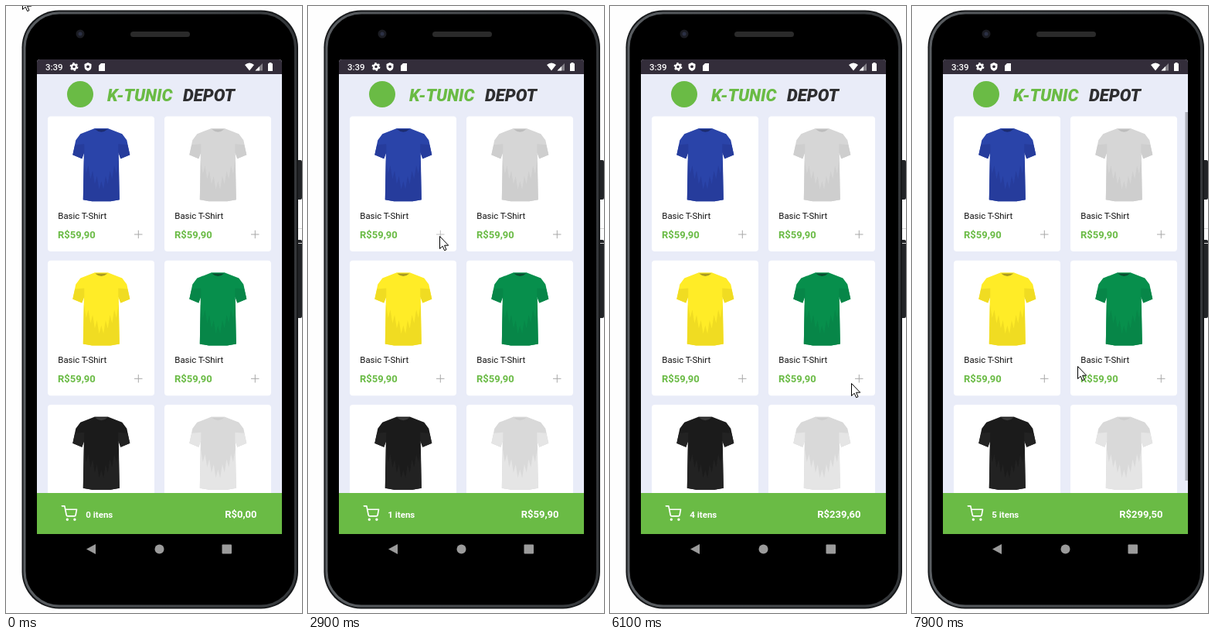
These frames come from a looping animation (383 by 784 pixels, 8 s). An HTML page:

```html
<!DOCTYPE html>
<html lang="en">
<head>
<meta charset="utf-8">
<title>Shop cart</title>
<style>
html, body { margin: 0; width: 100%; height: 100%; overflow: hidden; background: #fefefe; }
svg { display: block; }
text { font-family: Roboto, Arial, sans-serif; }
.bold { font-weight: 700; }
.price { font-size: 13px; font-weight: 700; }
</style>
</head>
<body>
<svg width="383" height="784" viewBox="0 0 383 784">
  <defs>
    <clipPath id="view"><rect x="40" y="137" width="317" height="492"/></clipPath>
    <linearGradient id="rim"><stop stop-color="#5a5e62"/><stop offset="1" stop-color="#34373a"/></linearGradient>
  </defs>

  <!-- phone -->
  <g fill="#222427">
    <rect x="376" y="199" width="7" height="51" rx="2"/>
    <rect x="376" y="302" width="7" height="101" rx="2"/>
  </g>
  <path d="M378 287.500h5M378 306.500h5" stroke="#d5d5d5"/>
  <rect x="20.500" y="5.500" width="357.500" height="773" rx="48" fill="#17191b"/>
  <rect x="24" y="9" width="350.500" height="766" rx="45" fill="#000" stroke="url(#rim)" stroke-width="3"/>
  <circle cx="96" cy="36" r="5.500" fill="#1b1c22"/>
  <circle cx="96" cy="36" r="2.500" fill="#2b3044"/>
  <rect x="161" y="33" width="77" height="7" rx="3.500" fill="#2a2a2a"/>

  <!-- screen and status bar -->
  <rect x="40" y="69" width="317" height="613" rx="4" fill="#e9ecf8"/>
  <path d="M40 88V73q0-4 4-4H353q4 0 4 4V88z" fill="#332d3a"/>
  <g fill="#fff">
    <text x="51" y="82.500" font-size="11.500" font-weight="500">3:39</text>
    <circle cx="88" cy="78.500" r="3" fill="none" stroke="#fff" stroke-width="2.500"/>
    <circle cx="88" cy="78.500" r="4.700" fill="none" stroke="#fff" stroke-width="1.500" stroke-dasharray="2.460"/>
    <path d="M106 73l4.500 2v3.500q0 4-4.500 5.500q-4.500-1.500-4.500-5.500V75z"/>
    <circle cx="106" cy="78.300" r="1.900" fill="#332d3a"/>
    <path d="M123 74h5v10h-8v-7z"/>
    <path d="M309 76q6-5 12 0l-6 7.500z"/>
    <path d="M332 74v9.500h-9.500z" opacity=".4"/>
    <path d="M328 78v5.500h-5.500z"/>
    <path d="M340.500 73h3v1.200h1.500V84h-6V74.200h1.500z"/>
  </g>

  <!-- header -->
  <circle cx="96" cy="114" r="17" fill="#6abb45"/>
  <g font-size="22" font-weight="900" font-style="italic">
    <text x="131" y="123" fill="#6abb45">K-TUNIC</text>
    <text x="229" y="123" fill="#2e2e30">DEPOT</text>
  </g>

  <g clip-path="url(#view)"><g id="list"></g></g>
  <rect id="bar" x="353.500" y="137" width="3.500" fill="#acaeb8"/>

  <!-- cart footer -->
  <rect x="40" y="629" width="317" height="53" fill="#6abb45"/>
  <g transform="translate(71.500 645) scale(.87)" fill="none" stroke="#fff" stroke-width="1.900" stroke-linecap="round" stroke-linejoin="round">
    <circle cx="9" cy="21" r="1"/><circle cx="20" cy="21" r="1"/>
    <path d="M1 1h4l2.680 13.390a2 2 0 0 0 2 1.610h9.720a2 2 0 0 0 2-1.610L23 6H6"/>
  </g>
  <text id="count" class="bold" x="103.300" y="661" font-size="11.500" fill="#fff"></text>
  <text id="total" class="price" x="324.500" y="661.300" text-anchor="end" fill="#fff"></text>

  <!-- navigation -->
  <g fill="#9b9b9b">
    <path d="M104 701.500L116 695v13z"/>
    <circle cx="198.500" cy="701.500" r="6"/>
    <rect x="279.500" y="695.500" width="12.500" height="12" rx="1"/>
  </g>

  <path id="cursor" d="M.5.500V16.500L4.200 13.200L6.600 18.700L9 17.700L6.600 12.200H11.700Z" fill="#fff" stroke="#000" stroke-linejoin="round"/>
</svg>
<script>
const LOOP = 8000, STEP = 100, PRICE = 59.9;
const $ = id => document.getElementById(id);
const money = value => 'R$' + value.toFixed(2).replace('.', ',');

// closes a right-hand outline with its mirror image
const mirror = half => half.concat(half.map(([x, y]) => [-x, y]).reverse());
const outline = points => 'M' + points.join('L') + 'Z';

const body = outline(mirror([[9, 0], [27, 7], [33, 15], [37, 34], [25, 39], [22.5, 31], [23.5, 92], [12, 94]]));
const cuffs = [1, -1].map(s => outline([[25 * s, 39], [37 * s, 34], [34 * s, 21], [22 * s, 20], [22 * s, 31]])).join('');

// jagged creases that rise towards the sides
const creases = outline(Array.from({ length: 17 }, (_, i) => {
  const x = (i - 8) * 2.8;
  return [x, 74 - Math.abs(x) * 1.2 + (i % 2 ? 8 : -6)];
}).concat([[23.5, 92], [12, 94], [-12, 94], [-23.5, 92]]));

// shirt, crease and collar colours
const shirts = [
  ['#2a44a9', '#263c9c', '#1b2b70'], ['#d6d6d6', '#cecece', '#bcbcbc'],
  ['#ffec27', '#f0dc22', '#a99a20'], ['#078f4c', '#078648', '#0b4d30'],
  ['#1b1b1b', '#222', '#3a3a3a'], ['#d9d9d9', '#e5e5e5', '#cfcfcf']
];

$('list').innerHTML = shirts.map(([main, crease, collar], i) => {
  const x = 54 + i % 2 * 151, y = 142.5 + (i >> 1) * 186.3;
  return `<g transform="translate(${x} ${y})">
    <rect width="138" height="174.500" rx="4" fill="#fff"/>
    <g transform="translate(69.300 15.700)">
      <path d="${body}" fill="${main}"/>
      <path d="${cuffs}${creases}" fill="${crease}"/>
      <path d="M-9 0H9Q6 7 0 7T-9 0" fill="${main}"/>
      <path d="M-8 1H8Q0 8-8 1" fill="${collar}"/>
    </g>
    <text x="13.300" y="132.500" font-size="11.400" fill="#111">Basic T-Shirt</text>
    <text class="price" x="13" y="157.500" fill="#6abb45">${money(PRICE)}</text>
    <path class="plus" d="M112 152.500h10.500M117.300 147.200v10.500" stroke="#a8a8a8"/>
  </g>`;
}).join('');
const pluses = document.querySelectorAll('.plus');

// pointer moves, resting in between
const home = [21, -12];
const moves = [
  { from: 300, to: 400, tip: [29, 3] },
  { from: 700, to: 1700, tip: [171, 311] },
  { from: 1800, to: 1900, tip: [174, 306] },
  { from: 2000, to: 2400, tip: [170, 297] },
  { from: 3300, to: 4000, tip: [325, 293] },
  { from: 4400, to: 4900, tip: [172, 483] },
  { from: 5500, to: 6100, tip: [312, 487] },
  { from: 6100, to: 6200, tip: [322, 487] },
  { from: 6700, to: 7300, tip: [217, 465] },
  { from: 7600, to: 7900, tip: [214, 465] }
];
const taps = [
  { product: 0, at: 2700 }, { product: 1, at: 4000 }, { product: 2, at: 5000 },
  { product: 2, at: 5600 }, { product: 3, at: 6600 }
];

const progress = (t, from, to) => Math.min(1, Math.max(0, (t - from) / (to - from)));
const easeOut = p => 1 - (1 - p) ** 2;

const pointerAt = t => moves.reduce((pos, { from, to, tip }) => {
  const p = easeOut(progress(t, from, to));
  return pos.map((v, i) => v + (tip[i] - v) * p);
}, home).map(Math.round);

// a pressed plus dims, then recovers once the item is added
function plusOpacity(t, product) {
  const tap = taps.find(k => k.product === product && t >= k.at - 200 && t < k.at + 300);
  return tap ? 0.3 + 0.7 * progress(t, tap.at, tap.at + 300) : 1;
}

function draw(now) {
  const t = Math.floor(now % LOOP / STEP) * STEP;
  $('cursor').setAttribute('transform', `translate(${pointerAt(t)})`);

  const items = taps.filter(tap => t >= tap.at).length;
  $('count').textContent = items + ' itens';
  $('total').textContent = money(items * PRICE);
  pluses.forEach((plus, i) => plus.setAttribute('opacity', plusOpacity(t, i)));

  const dragged = t >= 7600;
  const pull = dragged ? Math.round(5 * (1 - progress(t, 7600, 7900))) : 0;
  $('list').setAttribute('transform', `translate(0 ${pull})`);
  $('bar').setAttribute('height', dragged ? 476 - pull * 0.8 : 0);
  requestAnimationFrame(draw);
}
requestAnimationFrame(draw);
</script>
</body>
</html>
```
